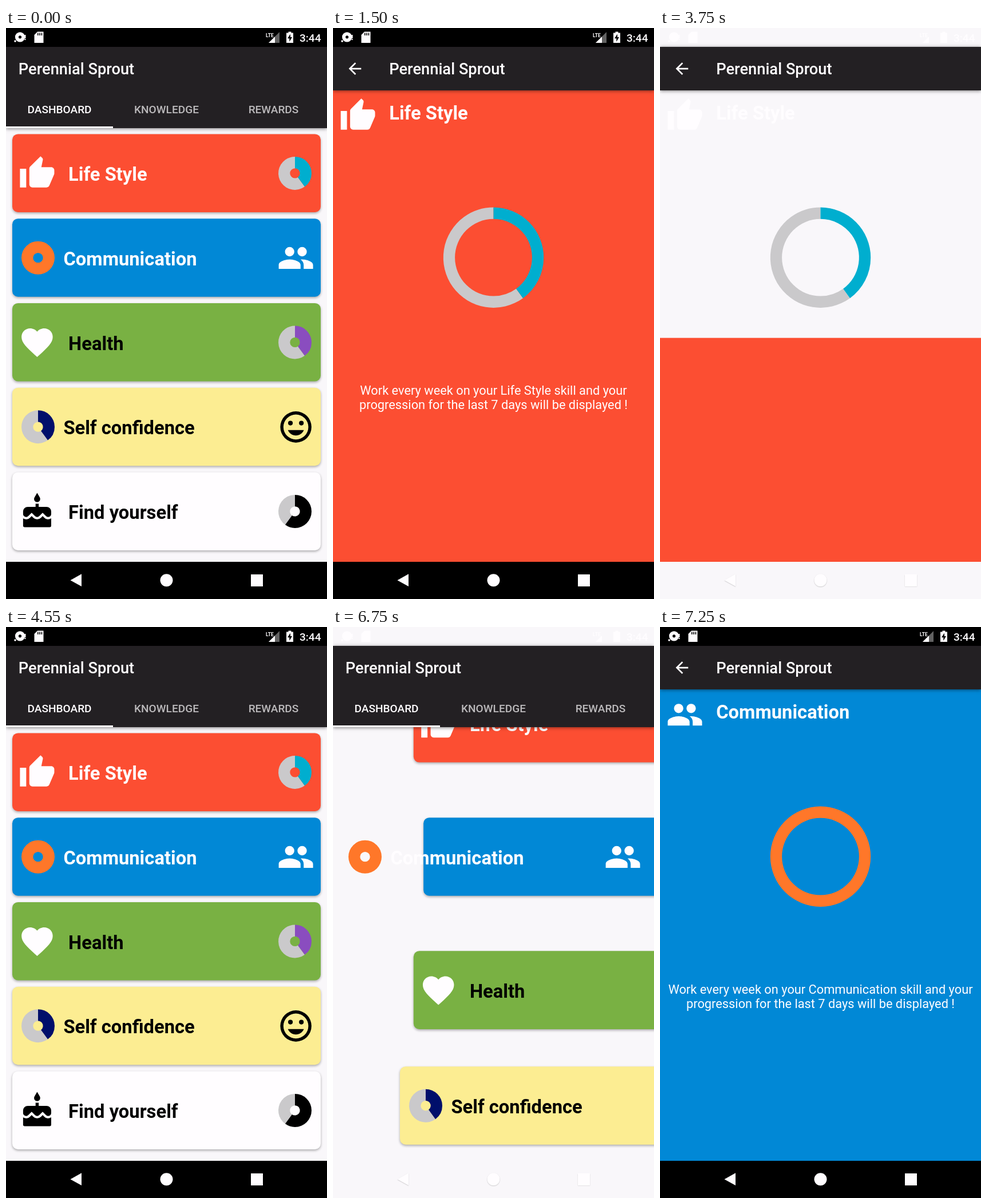
These frames come from a looping animation (561 px wide and 998 px high, 8 s). An HTML page with a canvas:

```html
<!DOCTYPE html>
<html lang="en">
<head>
<meta charset="utf-8">
<title>Skill dashboard</title>
<style>
  html, body { margin: 0; width: 100%; height: 100%; overflow: hidden; background: #f9f7fa; }
  canvas { display: block; width: 561px; height: 998px; }
</style>
</head>
<body>
<canvas id="stage"></canvas>
<script>
const W = 561, H = 998, LOOP = 8000;
const STATUS_H = 33, NAV_Y = 933;
const DP = 561 / 411.4;
const ICON = 2.727;
const WHITE = '#fffdff', PAPER = '#f9f7fa', DARK = '#232023', GREY = '#cac9cb';
const APP_NAME = 'Perennial Sprout';

// The screen only refreshes at these moments.
const STEPS = [0, 500, 600, 800, 1000, 1100, 1400, 1500, 3750, 3850, 3950, 4050, 4100,
  6500, 6550, 6750, 6800, 6850, 6900, 7000, 7050, 7200, 7250];

const path = (...parts) => new Path2D(parts.join(''));
const icons = {
  thumb: path('M1 21h4V9H1v12z',
    'M23 10c0-1.1-.9-2-2-2h-6.31l.95-4.57.03-.32c0-.41-.17-.79-.44-1.06L14.17 1 7.59 7.59',
    'C7.22 7.95 7 8.45 7 9v10c0 1.1.9 2 2 2h9c.83 0 1.54-.5 1.84-1.22l3.02-7.05',
    'c.09-.23.14-.47.14-.73z'),
  people: path('M13 8a3 3 0 1 1 6 0a3 3 0 1 1-6 0z', 'M5 8a3 3 0 1 1 6 0a3 3 0 1 1-6 0z',
    'M8 13c-2.33 0-7 1.17-7 3.5V19h14v-2.5c0-2.33-4.67-3.5-7-3.5z',
    'M16 13c-.29 0-.62.02-.97.05 1.16.84 1.97 1.97 1.97 3.45V19h6v-2.5c0-2.33-4.67-3.5-7-3.5z'),
  heart: path('M12 21.35l-1.45-1.32C5.4 15.36 2 12.28 2 8.5 2 5.42 4.42 3 7.5 3',
    'c1.74 0 3.41.81 4.5 2.09C13.09 3.81 14.76 3 16.5 3 19.58 3 22 5.42 22 8.5',
    'c0 3.78-3.4 6.86-8.55 11.54z'),
  smile: path('M2 12a10 10 0 1 1 20 0a10 10 0 1 1-20 0z', 'M4 12a8 8 0 1 0 16 0a8 8 0 1 0-16 0z',
    'M14 9.5a1.5 1.5 0 1 1 3 0a1.5 1.5 0 1 1-3 0z', 'M7 9.5a1.5 1.5 0 1 1 3 0a1.5 1.5 0 1 1-3 0z',
    'M12 17.5c2.33 0 4.31-1.46 5.11-3.5H6.89c.8 2.04 2.78 3.5 5.11 3.5z'),
  cake: path('M12 6a2 2 0 0 0 1.71-3.03L12 0l-1.71 2.97A2 2 0 0 0 12 6z',
    'M16.6 15.99l-1.07-1.07-1.08 1.07a3.46 3.46 0 0 1-4.89 0l-1.07-1.07-1.09 1.07',
    'A3.4 3.4 0 0 1 3 16.39V21a1 1 0 0 0 1 1h16a1 1 0 0 0 1-1v-4.61a3.4 3.4 0 0 1-4.4-.4z',
    'M18 9h-5V7h-2v2H6a3 3 0 0 0-3 3v1.54a1.96 1.96 0 0 0 3.34 1.39l2.14-2.13 2.13 2.13',
    'a1.96 1.96 0 0 0 2.77 0l2.14-2.13 2.13 2.13A1.96 1.96 0 0 0 21 13.54V12a3 3 0 0 0-3-3z'),
  back: path('M20 11H7.83l5.59-5.59L12 4l-8 8 8 8 1.41-1.41L7.83 13H20z')
};

const LEFT = 21.7, RIGHT = 473.9;
const skills = [
  { name: 'Life Style', color: '#fc4e32', ink: WHITE, icon: 'thumb', slice: '#00aecf', share: .4, iconX: LEFT },
  { name: 'Communication', color: '#0188d6', ink: WHITE, icon: 'people', slice: '#ff7729', share: 1, iconX: RIGHT },
  { name: 'Health', color: '#79b143', ink: '#000', iconInk: WHITE, icon: 'heart', slice: '#8a4dbf', share: .4, iconX: LEFT },
  { name: 'Self confidence', color: '#fced92', ink: '#000', icon: 'smile', slice: '#000f6b', share: .4, iconX: RIGHT },
  { name: 'Find yourself', color: WHITE, ink: '#000', icon: 'cake', slice: '#000', share: .6, iconX: LEFT }
].map((s, i) => {
  const top = 185.4 + 147.75 * i, iconLeft = s.iconX === LEFT;
  return { ...s, top, mid: top + 68.5, chartX: iconLeft ? 505 : 56, textX: iconLeft ? 109.1 : 100.4 };
});

const canvas = document.getElementById('stage');
const ctx = canvas.getContext('2d');
const dpr = window.devicePixelRatio || 1;
canvas.width = W * dpr;
canvas.height = H * dpr;

const clamp = v => Math.min(1, Math.max(0, v));
const lerp = (a, b, p) => a + (b - a) * p;

function label(str, x, y, size, weight, color, align = 'left') {
  ctx.font = `${weight} ${size}px Roboto, sans-serif`;
  ctx.textAlign = align;
  ctx.fillStyle = color;
  ctx.fillText(str, x, y);
}

function box(x, y, w, h, color) {
  ctx.fillStyle = color;
  ctx.fillRect(x, y, w, h);
}

function polygon(color, ...pts) {
  ctx.beginPath();
  pts.forEach(([x, y]) => ctx.lineTo(x, y));
  ctx.fillStyle = color;
  ctx.fill();
}

function disc(x, y, r, color) {
  ctx.beginPath();
  ctx.arc(x, y, r, 0, Math.PI * 2);
  ctx.fillStyle = color;
  ctx.fill();
}

function withShadow(alpha, blur, dy, draw) {
  ctx.save();
  ctx.shadowColor = `rgba(0,0,0,${alpha})`;
  ctx.shadowBlur = blur * dpr;
  ctx.shadowOffsetY = dy * dpr;
  draw();
  ctx.restore();
}

function drawIcon(name, x, y, scale, color) {
  ctx.save();
  ctx.translate(x, y);
  ctx.scale(scale, scale);
  ctx.fillStyle = color;
  ctx.fill(icons[name]);
  ctx.restore();
}

function sector(x, y, outer, inner, from, to, color) {
  const a = (from - .25) * Math.PI * 2, b = (to - .25) * Math.PI * 2;
  ctx.beginPath();
  ctx.arc(x, y, outer, a, b);
  ctx.arc(x, y, inner, b, a, true);
  ctx.fillStyle = color;
  ctx.fill();
}

function donut(s, x, y, outer, inner) {
  if (s.share < 1) sector(x, y, outer, inner, s.share, 1, GREY);
  sector(x, y, outer, inner, 0, s.share, s.slice);
}

// Icon, title and chart of a skill; p runs from card (0) to detail page (1).
function skillParts(s, p) {
  drawIcon(s.icon, lerp(s.iconX, 10.8, p), lerp(s.top + 36, 120.5, p), ICON, s.iconInk || s.ink);
  label(s.name, lerp(s.textX, 98.2, p), lerp(s.top + 81.7, 160.4, p), 24 * DP, 700, s.ink);
  donut(s, lerp(s.chartX, 280.5, p), lerp(s.mid, 401.2, p), lerp(29, 87.7, p), lerp(8.7, 67.4, p));
}

// Cards fly away from the tapped chart; the farther ones lead.
function cardOffset(s, tapped, base, entering) {
  const ex = tapped.chartX, ey = tapped.mid;
  const dx = W / 2 - ex, dy = s.mid - ey, d = Math.hypot(dx, dy);
  const reach = Math.hypot(Math.max(ex, W - ex), Math.max(ey, H - ey));
  const u = entering ? 1 - clamp(base) : clamp(base + d * .00027);
  const k = reach * u * u / d;
  return [dx * k, dy * k];
}

function cards(st) {
  ctx.save();
  ctx.beginPath();
  ctx.rect(0, STATUS_H, W, NAV_Y - STATUS_H);
  ctx.clip();
  skills.forEach((s, i) => {
    ctx.save();
    if (st.moving) ctx.translate(...cardOffset(s, skills[st.skill], st.base, st.entering));
    withShadow(.32, 4, 2, () => {
      ctx.beginPath();
      ctx.roundRect(11, s.top, 539, 136.6, 10);
      ctx.fillStyle = s.color;
      ctx.fill();
    });
    if (!st.moving || i !== st.skill) skillParts(s, 0);
    ctx.restore();
  });
  ctx.restore();
}

function detail(s, drop) {
  const y = 109 + drop;
  if (y >= NAV_Y) return;
  box(0, y, W, NAV_Y - y, s.color);
  const size = 16 * DP;
  label(`Work every week on your ${s.name} skill and your`, W / 2, 640.5 + drop, size, 400, WHITE, 'center');
  label('progression for the last 7 days will be displayed !', W / 2, 666.2 + drop, size, 400, WHITE, 'center');
}

function toolbar(isDetail) {
  withShadow(.5, 6, 1, () => box(0, STATUS_H, W, isDetail ? 76 : 142, DARK));
  label(APP_NAME, isDetail ? 98.2 : 21.8, 81.3, 20 * DP, 500, WHITE);
  if (isDetail) {
    drawIcon('back', 22, 54.7, DP, WHITE);
    return;
  }
  ['DASHBOARD', 'KNOWLEDGE', 'REWARDS'].forEach((t, i) =>
    label(t, 93.5 + 187 * i, 149.3, 14 * DP, 500, i ? '#bbb9bb' : WHITE, 'center'));
  box(0, 172, 187, 3, WHITE);
}

function statusBar(bar) {
  box(0, 0, W, STATUS_H, PAPER);
  box(0, 0, W, STATUS_H, `rgba(0,0,0,${bar})`);
  const hole = `rgba(0,0,0,${bar})`;
  disc(24.5, 15.8, 8.6, WHITE);
  disc(24.5, 15.8, 2.6, hole);
  disc(16, 23, 1.8, WHITE);
  box(32.5, 12, 2, 6, WHITE);
  box(32.5, 19, 2, 2, WHITE);
  polygon(WHITE, [55, 6.5], [65.5, 6.5], [65.5, 26], [49.5, 26], [49.5, 12]);
  for (let i = 0; i < 3; i++) box(55 + i * 3.3, 8.5, 1.6, 4.5, hole);
  polygon(`rgba(150,150,150,${bar * .65})`, [478, 7], [478, 26], [459, 26]);
  polygon(WHITE, [470, 15], [470, 26], [459, 26]);
  label('LTE', 454, 15.5, 8.5, 700, WHITE);
  box(493.5, 6.5, 5, 3, WHITE);
  box(490, 8.5, 12, 17.5, WHITE);
  polygon(hole, [497, 10.5], [492, 18.3], [495.3, 18.3], [495.3, 24], [500, 16], [497, 16]);
  label('3:44', 550.5, 23.8, 14 * DP, 500, WHITE, 'right');
}

function navBar(bar) {
  box(0, NAV_Y, W, H - NAV_Y, PAPER);
  box(0, NAV_Y, W, H - NAV_Y, `rgba(0,0,0,${bar})`);
  withShadow(.22, 1.5, .8, () => {
    polygon(WHITE, [112.5, 965.2], [132, 954.3], [132, 976]);
    disc(280.5, 965.2, 11, WHITE);
    box(428, 955, 21, 21, WHITE);
  });
}

const HOME = { page: 'home', bar: 1 };

function opening(t, skill, { start, white, enter, shown, dim, done }) {
  if (t < enter) return { page: 'home', skill, moving: true, base: (t - start) / 300, bar: t < white ? .5 : 0, move: 0 };
  if (t < shown) return { page: 'detail', skill, bar: 0, move: .5, drop: 410 };
  return { page: 'detail', skill, bar: t < dim ? 0 : t < done ? .5 : 1, move: 1, drop: 0 };
}

function closing(t, skill) {
  if (t < 3950) {
    const u = clamp((t - 3552) / 298);
    return { page: 'detail', skill, bar: 0, move: 1, drop: 980 * u * u };
  }
  const u = (t - 3800) / 300;
  return { page: 'home', skill, moving: true, entering: true, base: u, bar: t < 4050 ? 0 : .5, move: (1 - u) };
}

function stateAt(t) {
  if (t < 500) return HOME;
  if (t < 3750) return opening(t, 0, { start: 450, white: 600, enter: 1000, shown: 1100, dim: 1400, done: 1500 });
  if (t < 4100) return closing(t, 0);
  if (t < 6500) return HOME;
  return opening(t, 1, { start: 6638, white: 6550, enter: 7000, shown: 7050, dim: 7200, done: 7250 });
}

function render(time) {
  const t = STEPS.findLast(s => s <= time);
  const st = stateAt(t), isDetail = st.page === 'detail';
  ctx.setTransform(dpr, 0, 0, dpr, 0, 0);
  box(0, 0, W, H, PAPER);
  statusBar(st.bar);
  if (isDetail) detail(skills[st.skill], st.drop);
  else cards(st);
  if (isDetail || st.moving) skillParts(skills[st.skill], st.move);
  toolbar(isDetail);
  navBar(st.bar);
}

const began = performance.now();
function tick() {
  render((performance.now() - began) % LOOP);
  requestAnimationFrame(tick);
}
tick();
</script>
</body>
</html>
```
